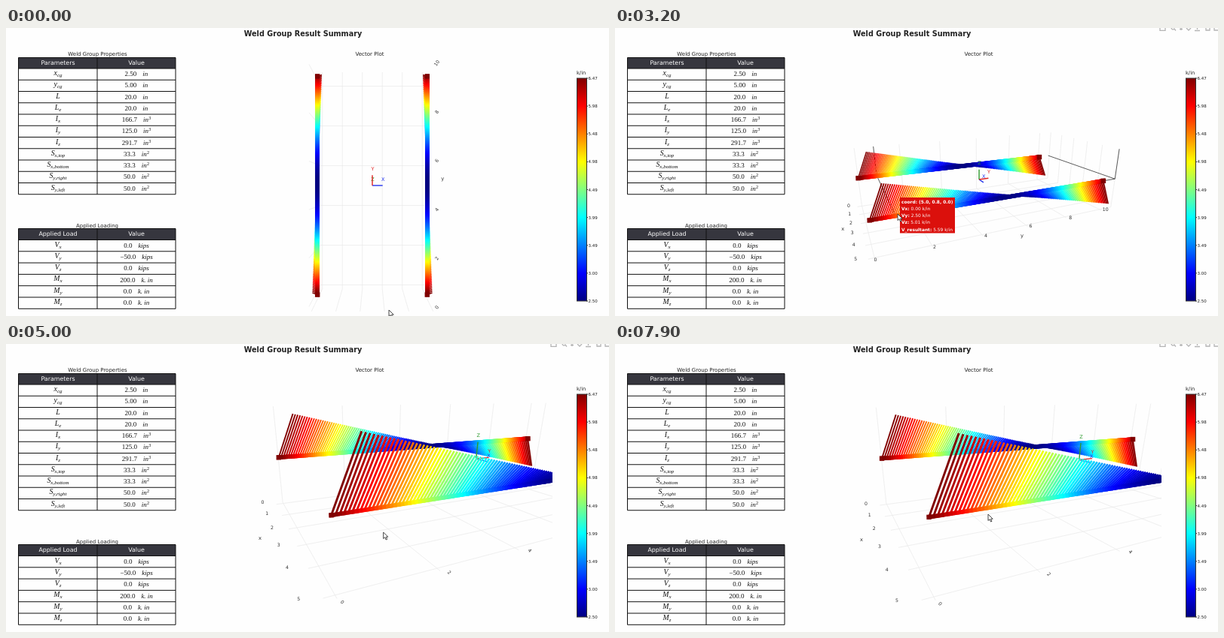
An HTML page with a canvas for the animation above (8 s loop, 800 px wide and 384 px high).

```html
<!DOCTYPE html>
<html lang="en">
<head>
<meta charset="utf-8">
<title>Weld Group Result Summary</title>
<style>
  html, body { margin: 0; width: 800px; height: 384px; overflow: hidden; background: #fefefe; }
  canvas, svg { position: absolute; left: 0; top: 0; width: 800px; height: 384px; }
  text { font-family: "DejaVu Sans", Verdana, sans-serif; fill: #222; }
  .math { font: 9px "Liberation Serif", "Times New Roman", serif; fill: #111; }
  .name { font-size: 9.8px; }
  .it { font-style: italic; }
  .b { font-weight: bold; }
  .mid { text-anchor: middle; }
  .head { font-size: 7.9px; fill: #fff; }
  .tip text { font-size: 5.9px; fill: #fff; }
</style>
</head>
<body>
<canvas id="plot"></canvas>
<svg id="page" viewBox="0 0 800 384"></svg>
<script>
const LOOP = 8000, STEP = 100;
const FOCAL = 412, CX = 486, CY = 211;
const BOX = { x0: -0.1, x1: 5.1, y0: -0.2, y1: 10.7, z: 1.4 };
const LENGTH = 10, VECTORS = 150, SHEAR = 2.5, MIN = 2.5, MAX = 6.474;

const clamp = v => Math.min(1, Math.max(0, v));
const ramp = (t, from, to) => clamp((t - from) / (to - from));

/* ---------- weld stress and colour ---------- */
const bending = y => 6 * (1 - y / 5);
const resultant = y => Math.hypot(SHEAR, bending(y));
const jet = q => `rgb(${[3, 2, 1].map(c => Math.round(255 * clamp(1.5 - Math.abs(4 * q - c))))})`;
const tint = y => jet(clamp((resultant(y) - MIN) / (MAX - MIN)));

/* ---------- motion ---------- */
function camera(t) {
  const spin = ramp(t, 400, 2800) ** 2;
  const zoom = ramp(t, 3500, 4400);
  const slide = ramp(t, 4600, 5200);
  const flat = spin === 0;
  return {
    flat,
    azimuth: 65.5 * spin ** 1.4,
    elevation: 90 - 71 * spin,
    distance: 14.15 - 5.45 * zoom,
    panX: -0.1 * spin + 3.34 * zoom - 0.5 * slide,
    panY: 0.035 + 0.275 * spin + 0.97 * zoom - 0.085 * slide,
    gap: flat ? 0.14 : 0.45 - 0.1 * spin,
    labelZ: flat ? 1.5 : -1.5 + 0.2 * spin,
    turnX: -65 * (1 - spin ** 3),
    turnY: -55 * clamp(1 - 2.2 * spin) + 45 * zoom,
  };
}

// Each stop is an arrival time and place; travel begins `lead` earlier.
const STOPS = [
  { at: 0, x: 508, y: 376 },
  { at: 2000, x: 462, y: 163, lead: 1600 },
  { at: 3000, x: 375, y: 248, lead: 1000 },
  { at: 4200, x: 494, y: 242 },
  { at: 5400, x: 514, y: 269 },
  { at: 6500, x: 429, y: 233 },
  { at: 7600, x: 495, y: 227 },
];
function pointer(t) {
  let { x, y } = STOPS[0];
  for (const s of STOPS.slice(1)) {
    const q = ramp(t, s.at - (s.lead || 600), s.at);
    x += (s.x - x) * q;
    y += (s.y - y) * q;
  }
  return [x, y];
}

const TIPS = [
  { from: 3000, to: 3500, left: 378, top: 226, y: 0.8291, fill: "#db100c" },
  { from: 6500, to: 7100, left: 433, top: 206, y: 0.175, fill: "#880004" },
];

/* ---------- static page ---------- */
const page = document.getElementById("page");
const text = (x, y, s, cls = "", size = "") =>
  `<text x="${x}" y="${y}" class="${cls}"${size && ` font-size="${size}"`}>${s}</text>`;

function table(top, heads, rows, headH, rowH) {
  const bottom = top + headH + rows.length * rowH, headY = top + headH / 2 + 2.2;
  let out = `<rect x="16.5" y="${top}" width="208.5" height="${headH}" fill="#36363e"/>` +
    text(69, headY, heads[0], "head mid") + text(173, headY, heads[1], "head mid");
  let lines = `M16.5 ${top}H225V${bottom}H16.5ZM121 ${top}V${bottom}`;
  rows.forEach((row, i) => {
    const [name, sub, value, unit, power] = row.split("|");
    const y = top + headH + i * rowH;
    lines += `M16.5 ${y}H225`;
    out += text(69, y + 9, `${name}<tspan dy="2" font-size="7">${sub}</tspan>`, "math name it mid");
    out += text(173, y + 10.2, `${value}<tspan dx="8" class="it">${unit}</tspan>` +
      (power ? `<tspan dy="-3" font-size="6">${power}</tspan>` : ""), "math mid");
  });
  return out + `<path d="${lines}" fill="none" stroke="#111"/>`;
}

function colorBar() {
  let stops = "", ticks = "";
  for (let i = 0; i <= 8; i++) {
    const q = i / 8, y = 67 + 297 * q;
    stops += `<stop offset="${q}" stop-color="${jet(1 - q)}"/>`;
    ticks += `<path d="M770 ${y}h2" stroke="#333"/>` +
      text(772.5, y + 2, (MAX - (MAX - MIN) * q).toFixed(2), "", 5.5);
  }
  return `<linearGradient id="jet" x1="0" y1="0" x2="0" y2="1">${stops}</linearGradient>` +
    `<rect x="757.5" y="67" width="13" height="297" fill="url(#jet)" stroke="#333"/>` +
    text(757, 62, "k/in", "", 6.7) + ticks;
}

function tipBox({ left, top, y, fill }) {
  const force = (name, v) => [name + ":", ` ${v.toFixed(2)} k/in`];
  const lines = [
    [`coord: (5.0, ${y.toFixed(1)}, 0.0)`, ""],
    force("Vx", 0), force("Vy", SHEAR), force("Vz", bending(y)), force("V_resultant", resultant(y)),
  ];
  return `<g class="tip" visibility="hidden"><rect x="${left}" y="${top}" width="73" height="47.5" fill="${fill}"/>` +
    lines.map(([bold, rest], i) =>
      text(left + 2, top + 7.5 + i * 9.3, `<tspan class="b">${bold}</tspan>${rest}`)).join("") + `</g>`;
}

page.innerHTML =
  text(394, 10.6, "Weld Group Result Summary", "b mid", 9.68) +
  text(121.5, 37, "Weld Group Properties", "mid", 7) +
  text(121, 266, "Applied Loading", "mid", 7) +
  text(482.5, 37, "Vector Plot", "mid", 7.1) +
  table(39.5, ["Parameters", "Value"], [
    "x|cg|2.50|in", "y|cg|5.00|in", "L||20.0|in", "L|e|20.0|in",
    "I|x|166.7|in|3", "I|y|125.0|in|3", "I|z|291.7|in|3",
    "S|x,top|33.3|in|2", "S|x,bottom|33.3|in|2", "S|y,right|50.0|in|2", "S|y,left|50.0|in|2",
  ], 14.5, 15.25) +
  table(267.5, ["Applied Load", "Value"], [
    "V|x|0.0|kips", "V|y|−50.0|kips", "V|z|0.0|kips",
    "M|x|200.0|k. in", "M|y|0.0|k. in", "M|z|0.0|k. in",
  ], 15, 15.3) +
  colorBar() +
  `<path id="bar" d="M723 0v3.3h7v-3.3M738 0a2.2 2.2 0 0 0 4 1l2 2.5M751 0v3M749 1.5h4M758 0l3 3 3-3M769 3.5h7M772.5 0v2M784 0v3h5v-3M795 0v3h5" fill="none" stroke="#b4b4b4" stroke-width="1.3"/>` +
  TIPS.map(tipBox).join("") +
  `<path id="hand" d="M0 0V8.5L2 6.7L3.5 10L5 9.3L3.5 6.2H6.2Z" fill="#fff" stroke="#333" stroke-width=".9"/>`;

const bar = document.getElementById("bar");
const hand = document.getElementById("hand");
const tipNodes = page.querySelectorAll(".tip");

/* ---------- 3D plot ---------- */
const canvas = document.getElementById("plot");
const ratio = Math.max(1, window.devicePixelRatio || 1);
canvas.width = 800 * ratio;
canvas.height = 384 * ratio;
const ctx = canvas.getContext("2d");

// Returns a function from plot coordinates to screen x, y and scale.
function projector({ azimuth, elevation, distance, panX, panY }) {
  const a = azimuth * Math.PI / 180, e = elevation * Math.PI / 180;
  const ca = Math.cos(a), sa = Math.sin(a), ce = Math.cos(e), se = Math.sin(e);
  return (x, y, z) => {
    x -= 2.5; y -= 5;
    const into = y * ca - x * sa;
    const s = FOCAL / (distance + into * ce - z * se);
    return [CX + s * (x * ca + y * sa + panX), CY - s * (into * se + z * ce + panY), s];
  };
}

function line(p, q, color, width) {
  ctx.strokeStyle = color;
  ctx.lineWidth = width;
  ctx.beginPath();
  ctx.moveTo(p[0], p[1]);
  ctx.lineTo(q[0], q[1]);
  ctx.stroke();
}

function label(s, [x, y], turn = 0, color = "#333", size = 6.2) {
  ctx.save();
  ctx.translate(x, y);
  ctx.rotate(turn * Math.PI / 180);
  ctx.font = `${size}px "DejaVu Sans", Verdana, sans-serif`;
  ctx.fillStyle = color;
  ctx.fillText(s, 0, 0);
  ctx.restore();
}

function grid(at, yWall) {
  const { x0, x1, y0, y1, z } = BOX;
  const draw = (p, q) => line(at(...p), at(...q), "#e8e8e8", 0.7);
  for (let x = 0; x <= 5; x++) {
    draw([x, y0, -z], [x, y1, -z]);
    draw([x, yWall, -z], [x, yWall, z]);
  }
  for (let y = 0; y <= LENGTH; y += 2) {
    draw([x0, y, -z], [x1, y, -z]);
    draw([x0, y, -z], [x0, y, z]);
  }
}

// Guide lines from a hovered point on the near weld to the walls.
function spikes(at, y) {
  const { x0, y1, z } = BOX;
  const draw = (p, q) => line(at(...p), at(...q), "#333", 0.8);
  draw([5, y, 0], [x0, y, 0]);
  draw([5, y, 0], [5, y1, 0]);
  draw([x0, y, 0], [x0, y, z]);
  draw([5, y1, 0], [5, y1, z]);
  draw([x0, y1, 0], [5, y1, 0]);
}

function weld(at, x) {
  const step = LENGTH / VECTORS;
  for (let y = LENGTH; y > -step / 2; y -= step) {
    const p = at(x, y, 0);
    line(p, at(x, y + SHEAR / 5, bending(y) / 5), tint(y), 0.9 + 0.022 * p[2]);
  }
  ctx.lineCap = "square";
  for (let y = LENGTH - step; y > -step / 2; y -= step) {
    line(at(x, y, 0), at(x, y + step, 0), tint(y + step / 2), 5.5);
  }
  ctx.lineCap = "butt";
  for (const y of [0, LENGTH]) {
    const [px, py] = at(x, y, 0);
    ctx.fillStyle = tint(y);
    ctx.fillRect(px - 3.2, py - 3.2, 6.4, 6.4);
  }
}

function triad(at) {
  const o = at(2.5, 5, 0), k = 0.47;
  const arm = (s, x, y, z, color) => {
    const p = at(2.5 + x, 5 + y, z);
    line(o, p, color, 1.4);
    label(s, [p[0] + 0.5, p[1] - 8], 0, color, 6.5);
  };
  arm("Z", 0, 0, k, "#2e9a2e");
  arm("X", k, 0, 0, "#2233ee");
  arm("Y", 0, k, 0, "#e02222");
}

function drawPlot(t, tip) {
  const cam = camera(t), at = projector(cam);
  ctx.setTransform(ratio, 0, 0, ratio, 0, 0);
  ctx.clearRect(0, 0, 800, 384);
  ctx.textAlign = "center";
  ctx.textBaseline = "middle";
  ctx.save();
  ctx.beginPath();
  ctx.rect(247, 40, 478, 343);
  ctx.clip();
  grid(at, cam.flat ? BOX.y0 : BOX.y1);
  if (tip) spikes(at, tip.y);
  for (let x = 0; x <= 5; x++) label(x, at(x, -0.58, cam.labelZ), cam.turnX);
  for (let y = 0; y <= LENGTH; y += 2) label(y, at(5 + cam.gap, y, cam.labelZ), cam.turnY);
  label("x", at(2.5, -0.9, cam.labelZ), 0, "#333", 6.8);
  label("y", at(5 + cam.gap * 2.6, 5.25, cam.labelZ), 0, "#333", 6.8);
  weld(at, 0);
  triad(at);
  weld(at, 5);
  ctx.restore();
}

function frame() {
  const t = Math.floor(performance.now() % LOOP / STEP) * STEP;
  const tip = TIPS.find(o => t >= o.from && t < o.to);
  drawPlot(t, tip);
  TIPS.forEach((o, i) => tipNodes[i].setAttribute("visibility", o === tip ? "visible" : "hidden"));
  bar.setAttribute("visibility", t >= 200 ? "visible" : "hidden");
  hand.setAttribute("transform", `translate(${pointer(t)})`);
  requestAnimationFrame(frame);
}
frame();
</script>
</body>
</html>
```
